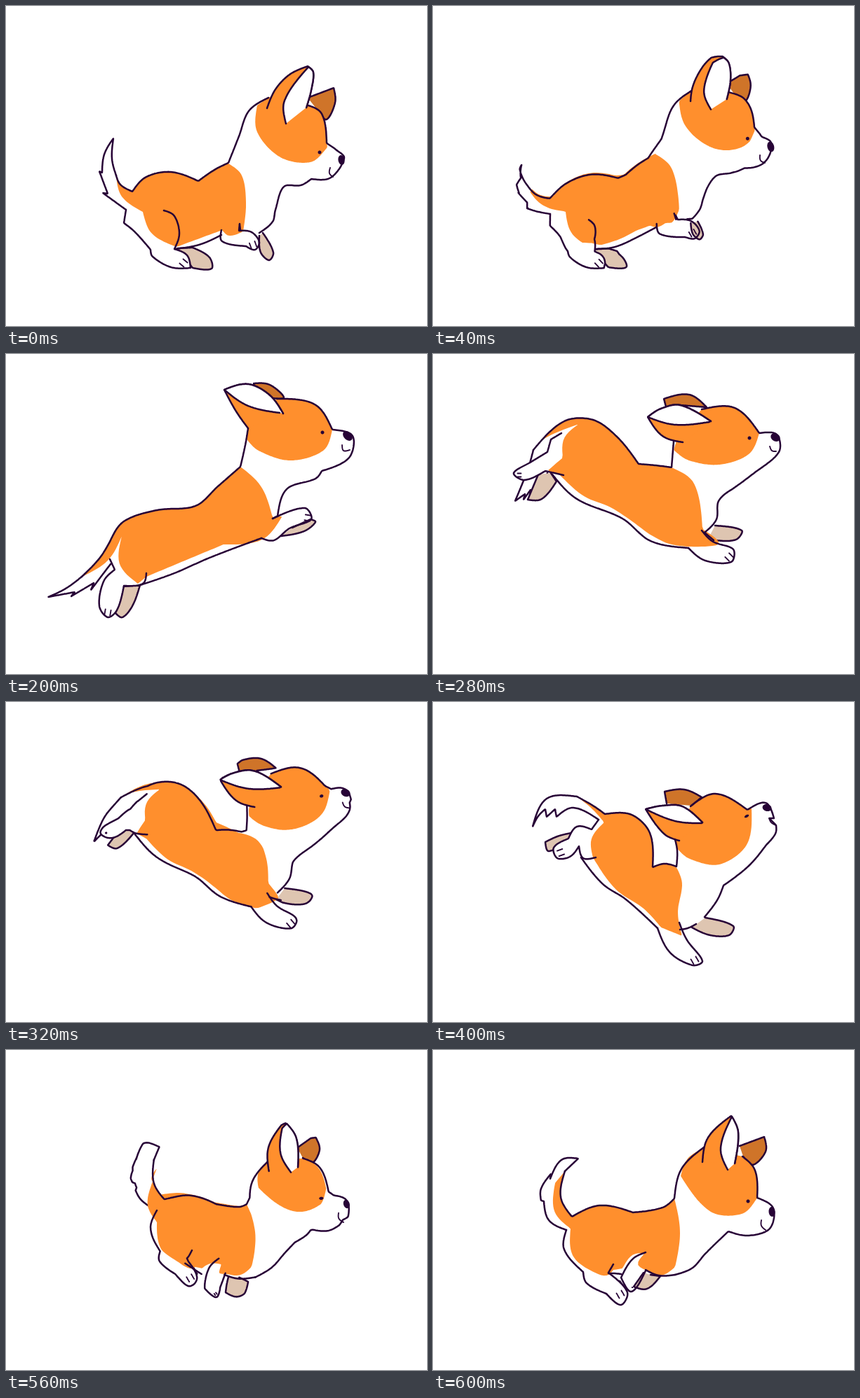
Write an HTML page that moves like this. It is 600 by 457 pixels and loops after 0.64 s.

```html
<!DOCTYPE html>
<html lang="en">
<head>
<meta charset="utf-8">
<title>Running corgi</title>
<style>
html, body { margin: 0; width: 100%; height: 100%; overflow: hidden; background: #fff; }
svg { display: block; width: 100vw; height: 100vh; }
</style>
</head>
<body>
<svg id="stage" viewBox="0 0 600 457" fill="none" stroke-width="2.5" stroke-linecap="round" stroke-linejoin="round"></svg>
<script>
const LOOP = 640, STEP = 40, SAMPLES = 160;
const INK = '#270336', ORANGE = '#ff8f2d', RUST = '#cf7429', TAN = '#dec5b1', WHITE = '#fff';
const poses = [];

const mix = (p, q, t) => [p[0] + (q[0] - p[0]) * t, p[1] + (q[1] - p[1]) * t];
const radians = degrees => degrees * Math.PI / 180;
const join = (...runs) => runs.join(' / ');

function ellipse(x, y, rx, ry, angle = 0) {
  const c = Math.cos(radians(angle)), s = Math.sin(radians(angle));
  return Array.from({ length: 13 }, (_, i) => {
    const u = rx * Math.cos(i * Math.PI / 6), v = ry * Math.sin(i * Math.PI / 6);
    return `${x + u * c - v * s} ${y + u * s + v * c}`;
  }).join(' ');
}

// Two short parallel strokes across a paw.
function toes(x, y, angle, size = 4) {
  const c = Math.cos(radians(angle)) * size, s = Math.sin(radians(angle)) * size;
  return [-1, 1].map(k =>
    `${x - c - k * s} ${y - s + k * c} ${x + c - k * s} ${y + s + k * c}`).join('|');
}

// Smooth curve through the points, with tangents weighted by chord length.
function spline(points) {
  const last = points.length - 1, out = [points[0]];
  const gap = i => Math.hypot(points[i + 1][0] - points[i][0], points[i + 1][1] - points[i][1]) || 1;
  const slope = (i, n) => (points[i + 1][n] - points[i - 1][n]) / (gap(i) + gap(i - 1));
  for (let i = 0; i < last; i++) {
    for (let k = 1; k <= 10; k++) {
      const t = k / 10;
      out.push([0, 1].map(n => {
        const a = points[i][n], d = points[i + 1][n] - a;
        let m0 = i > 0 ? slope(i, n) * gap(i) : null;
        let m1 = i + 1 < last ? slope(i + 1, n) * gap(i) : null;
        if (m0 === null) m0 = m1 === null ? d : 1.5 * d - m1 / 2;
        if (m1 === null) m1 = 1.5 * d - m0 / 2;
        return a + t * (m0 + t * (3 * d - 2 * m0 - m1 + t * (m0 + m1 - 2 * d)));
      }));
    }
  }
  return out;
}

// Evenly spaced points let outlines with different corners blend into each other.
function resample(points) {
  const at = [0];
  for (let i = 1; i < points.length; i++)
    at.push(at[i - 1] + Math.hypot(points[i][0] - points[i - 1][0], points[i][1] - points[i - 1][1]));
  const total = at[at.length - 1];
  let i = 1;
  return Array.from({ length: SAMPLES }, (_, k) => {
    const s = total * k / (SAMPLES - 1);
    while (i < at.length - 1 && at[i] < s) i++;
    return mix(points[i - 1], points[i], (s - at[i - 1]) / (at[i] - at[i - 1] || 1));
  });
}

// "/" follows a corner point.
function trace(text) {
  let line = [];
  for (const run of text.split('/')) {
    const n = run.trim().split(/\s+/).map(Number), points = line.slice(-1);
    for (let i = 0; i < n.length; i += 2) points.push([n[i], n[i + 1]]);
    line = line.slice(0, -1).concat(spline(points));
  }
  return resample(line);
}

// Fills share their edges with the outlines next to them.
const addPose = time => poses.push({ time, parts: {} });
const set = parts => Object.assign(poses[poses.length - 1].parts, parts);
const torso = (nape, spine, edge, belly, chest, tail) =>
  set({ back: join(nape, spine), coat: join(nape.split(' ').slice(-2).join(' '), spine, edge), belly, chest, tail });
const legs = (hind, fore, farHind, farFore, hindToes, foreToes) =>
  set({ hind, fore, farHind, farFore, hindToes, foreToes });
const head = (brow, muzzle, cheek, mouth, nose, eye) =>
  set({ front: join(brow, muzzle), face: join(brow, cheek), mouth, nose, eye });
const ears = (outer, inner, fold, farEar) =>
  set({ ear: join(outer, inner), earInside: join(fold, inner), farEar });

addPose(0);
torso('374 131 346 150 332 186 317 224',
  '297 234 274 250 / 235 237 200 244 180 265 / 163 255 157 242',
  '165 272 195 294 / 208 325 243 344 / 308 320 / 318 328 338 322 / 342 280 336 242 317 225',
  '240 347 275 341 307 327', '334 320 333 312',
  '157 242 151 218 153 189 / 140 212 137 238 / 133 236 / 145 268 / 138 267 / 171 291');
legs('171 291 168 310 / 183 322 206 348 / 209 358 235 373 263 374 / 258 356 240 347 / 247 325 240 300 225 292',
  '307 320 308 336 342 343 / 355 348 361 337 350 323 332 321 / 333 311',
  '245 346 266 345 / 290 359 293 375 266 374 / 250 354', '361 328 363 352 375 363 381 352 366 324',
  toes(253, 367, 40), toes(352, 341, 70));
head('428 141 450 154 457 196',
  '470 205 482 217 463 245 435 247 / 420 256 396 258 384 291 380 308 361 324',
  '457 203 434 223 391 216 358 180 358 142 / 375 130',
  '462 231 461 239 466 244', ellipse(478, 220, 7, 4.5, 80), ellipse(447, 209, 2.5, 2.5));
ears('372 146 384 119 404 98 430 86', '438 95 435 120 428 145', '399 168 397 135 431 87',
  '430 131 467 117 / 469 138 457 162 445 150');

addPose(120);
torso('356 102 335 128 318 184',
  '282 207 257 237 / 208 244 165 275 / 135 296 100 299',
  '145 304 177 293 / 180 325 200 347 / 215 337 / 260 330 290 308 / 320 296 335 278 / 352 287 370 275 / 348 210 318 185',
  '214 348 255 344 300 317 342 293', '371 274 365 265',
  '100 299 82 293 69 283 / 75 306 95 315 / 82 318 / 100 328 121 328 / 115 334 / 140 328 159 309');
legs('159 309 171 337 / 163 352 183 372 213 374 / 216 362 196 351 / 210 345 216 332',
  '342 293 354 305 405 302 417 290 403 275 371 274',
  '199 349 230 349 / 227 355 240 369 217 371 / 200 352', '380 274 390 274 400 275',
  toes(203, 368, 60), toes(406, 291, 40));
head('403 86 448 100 463 148',
  '488 153 492 175 472 197 443 201 / 398 225 384 249 371 274 / 365 265',
  '427 174 377 163 337 123 / 352 103',
  '474 177 478 184 487 184', ellipse(488, 163, 8.5, 5.5, 70), ellipse(451, 150, 2.5, 2.5));
ears('357 116 351 95 355 55 361 37', '376 42 400 73 400 109', '390 107 368 88 361 38',
  '396 70 404 54 / 418 66 419 86 403 84');

addPose(200);
torso('345 106 341 130 334 161',
  '302 189 270 217 215 223 168 239 148 268 / 133 292 108 318',
  '145 295 165 260 / 162 300 188 328 / 200 318 / 255 295 310 272 / 365 265 394 231 / 380 234 / 364 190 334 161',
  '188 331 240 313 290 291 364 263', '380 235 388 231',
  '108 318 85 335 60 347 / 98 340 / 93 346 / 125 327 / 121 337 / 149 300');
legs('148 293 155 308 / 139 325 133 360 145 376 158 366 168 331 / 195 328 200 313',
  '364 263 382 266 404 249 435 236 426 220 380 235',
  '167 332 191 330 / 180 360 166 376 156 370 / 167 332', '392 260 / 425 253 441 240 434 236 / 408 248',
  toes(145, 369, 100), toes(430, 234, 10));
head('386 64 440 72 465 108',
  '494 117 489 148 450 167 / 441 178 400 193 387 232',
  '452 138 405 152 360 138 342 120 / 345 106',
  '479 130 481 138 490 137', ellipse(487, 117, 8, 5.5, 45), ellipse(451, 112, 2.5, 2.5));
ears('345 106 328 82 311 51', '345 43 375 58 395 85', '390 84 345 74 311 51',
  '354 48 353 42 / 376 44 396 62 378 63');

addPose(280);
torso('343 125 340 162',
  '317 159 293 157 / 262 118 228 94 187 96 143 137',
  '160 120 208 100 / 187 120 185 148 / 163 167 / 180 172 / 215 203 255 220 305 255 / 340 272 388 275 / 408 270 384 250 / 372 185 340 162',
  '170 172 205 207 270 235 310 267 364 277', '387 255 400 266',
  '143 137 135 165 117 210 / 131 200 / 129 208 / 139 194 / 138 206 / 147 186 / 150 200 / 163 170');
legs('183 113 168 122 / 163 140 / 140 154 115 170 130 180 160 167 / 186 173',
  '364 277 388 295 425 297 428 279 399 268 383 252',
  '168 170 176 182 / 155 207 135 208 / 150 172', '393 262 402 266 / 432 265 440 252 402 245',
  toes(123, 173, 0, 2.5), toes(422, 290, 45));
head('383 79 430 77 465 113',
  '490 115 493 140 455 172 428 192 / 407 210 404 236 387 255',
  '450 143 408 158 365 152 343 137 / 350 115',
  '480 132 483 138 489 139', ellipse(488, 119, 7, 5.5, 30), ellipse(451, 120, 2.5, 2.5));
ears('356 126 327 117 306 90', '325 78 352 73 396 96', '394 97 345 101 306 90',
  '332 75 329 64 / 365 58 390 76 / 352 73');

addPose(400);
torso('344 193 348 212 347 235 / 330 231 313 236',
  '309 187 283 161 245 160 / 228 148 205 135',
  '226 152 244 172 / 226 195 228 222 / 260 267 300 295 325 322 / 355 334 / 349 300 355 260 347 236 / 330 231 313 236',
  '211 222 242 260 275 282 320 323', '352 325 363 323 375 317',
  '205 135 162 138 142 178 / 150 163 160 153 / 162 164 / 174 153 / 176 164 / 200 151 236 168');
legs('236 168 226 182 / 205 178 193 195 / 172 208 177 223 195 221 208 206 / 214 223 232 222',
  '320 323 338 358 370 376 384 370 362 340 351 315',
  '204 186 195 197 / 165 213 160 200 / 180 191 204 186', '369 322 395 333 422 333 428 320 388 308',
  toes(182, 215, 160), toes(373, 369, 60));
head('367 149 403 131 448 154',
  '474 144 486 166 / 479 166 / 489 176 / 488 188 475 204 / 450 234 414 262 / 405 283 387 307',
  '454 152 / 447 204 408 232 366 224 346 207 / 345 193',
  '479 166 482 172 489 176', ellipse(476, 151, 6.5, 5, 15), ellipse(447, 163, 3.5, 1.8, -30));
ears('351 198 329 188 303 153', '328 148 355 149 384 172', '383 173 345 170 303 153',
  '333 145 330 128 / 358 125 383 136 / 368 148');

addPose(480);
torso('348 199 343 223 350 243 / 341 236',
  '329 196 291 173 / 272 154 256 126',
  '267 158 280 178 / 254 212 262 262 / 285 280 302 326 / 326 346 / 333 326 / 358 312 363 275 352 245 / 341 236',
  '266 276 281 297 300 320', '328 335 350 336 377 331',
  '256 126 240 102 230 77 / 223 98 225 122 / 233 123 / 227 133 / 241 143 / 235 143 / 265 173');
legs('265 173 237 200 231 228 / 217 239 238 275 255 289 264 279 262 257 / 275 256 281 246',
  '304 315 298 336 311 370 338 373 328 350 / 332 326',
  '262 258 264 268 265 275', '351 336 359 353 380 373 397 368 377 332',
  toes(254, 279, 60), toes(328, 367, 60));
head('388 160 428 158 461 194',
  '488 190 497 213 / 486 212 / 496 225 / 486 244 461 249 / 455 263 433 268 / 400 306 375 332',
  '448 220 412 235 370 229 345 208 / 355 196',
  '486 212 487 220 495 224', ellipse(490, 198, 6, 5, 40), ellipse(450, 203.5, 4.5, 1.5, -10));
ears('356 199 338 165 338 126', '350 126 374 142 388 178', '378 182 351 157 338 126',
  '371 145 375 124 / 393 137 398 156 385 158');

addPose(600);
torso('386 139 354 170 344 212',
  '327 225 285 232 / 238 222 198 238 / 182 210 188 173',
  '174 190 / 173 230 196 255 / 200 295 235 320 / 248 322 257 314 / 270 312 / 284 293 302 290 / 292 306 305 315 / 325 322 345 310 / 352 260 344 212',
  '250 319 258 319 268 320', '303 314 322 322 345 321',
  '188 173 207 155 / 183 157 167 184 / 168 177 / 154 198 154 215 / 158 216 / 165 243 190 257');
legs('190 257 187 285 214 317 / 219 333 247 348 / 268 364 277 346 250 318 / 257 306',
  '303 289 284 299 268 325 / 283 345 303 315',
  '266 330 272 338 276 342', '300 318 286 338 / 305 341 324 323 / 310 321',
  toes(267, 349, 60), toes(284, 339, 0, 0.2));
head('441 152 459 172 462 211',
  '485 226 480 255 450 265 421 259 / 388 291 370 311 345 321',
  '440 234 396 231 353 180 / 363 155 387 140',
  '468 243 468 251 474 257', ellipse(483, 231, 7, 4.5, 85), ellipse(449, 216, 2.5, 2.5));
ears('384 160 392 125 425 94', '435 118 430 162', '420 171 410 140 426 95',
  '437 137 472 124 / 474 145 456 164 442 152');

for (const { parts } of poses)
  for (const name in parts) parts[name] = parts[name].split('|').map(trace);

const line = name => [name, 'none', INK];
const patch = (name, fill) => [name, fill, 'none'];
const layers = [
  line('tail'), ['farFore', TAN, INK], ['farHind', TAN, INK], patch('hind', WHITE),
  ['farEar', RUST, INK], patch('coat', ORANGE), patch('face', ORANGE),
  line('back'), line('front'), ['ear', ORANGE, INK], ['earInside', WHITE, INK],
  line('belly'), line('chest'), line('hind'), line('fore'),
  line('hindToes'), line('foreToes'), line('mouth'), patch('eye', INK), patch('nose', INK)
];
const thin = ['hindToes', 'foreToes', 'mouth'];

const stage = document.getElementById('stage');
const paths = layers.map(([name, fill, stroke]) => {
  const path = document.createElementNS('http://www.w3.org/2000/svg', 'path');
  path.setAttribute('fill', fill);
  path.setAttribute('stroke', stroke);
  if (thin.includes(name)) path.setAttribute('stroke-width', 1.8);
  return stage.appendChild(path);
});

function draw(time) {
  const n = poses.findLastIndex(pose => pose.time <= time);
  const from = poses[n], to = poses[(n + 1) % poses.length];
  const t = (time - from.time) / ((to.time || LOOP) - from.time);
  layers.forEach(([name], i) => {
    const target = to.parts[name];
    paths[i].setAttribute('d', from.parts[name].map((points, j) =>
      'M' + points.map((p, k) => mix(p, target[j][k], t).map(v => v.toFixed(1))).join('L')).join(''));
  });
}

let start = null, shown = -1;
function tick(now) {
  if (start === null) start = now;
  const time = Math.floor((now - start) % LOOP / STEP) * STEP;
  if (time !== shown) draw(shown = time);
  requestAnimationFrame(tick);
}
draw(0);
requestAnimationFrame(tick);
</script>
</body>
</html>
```
